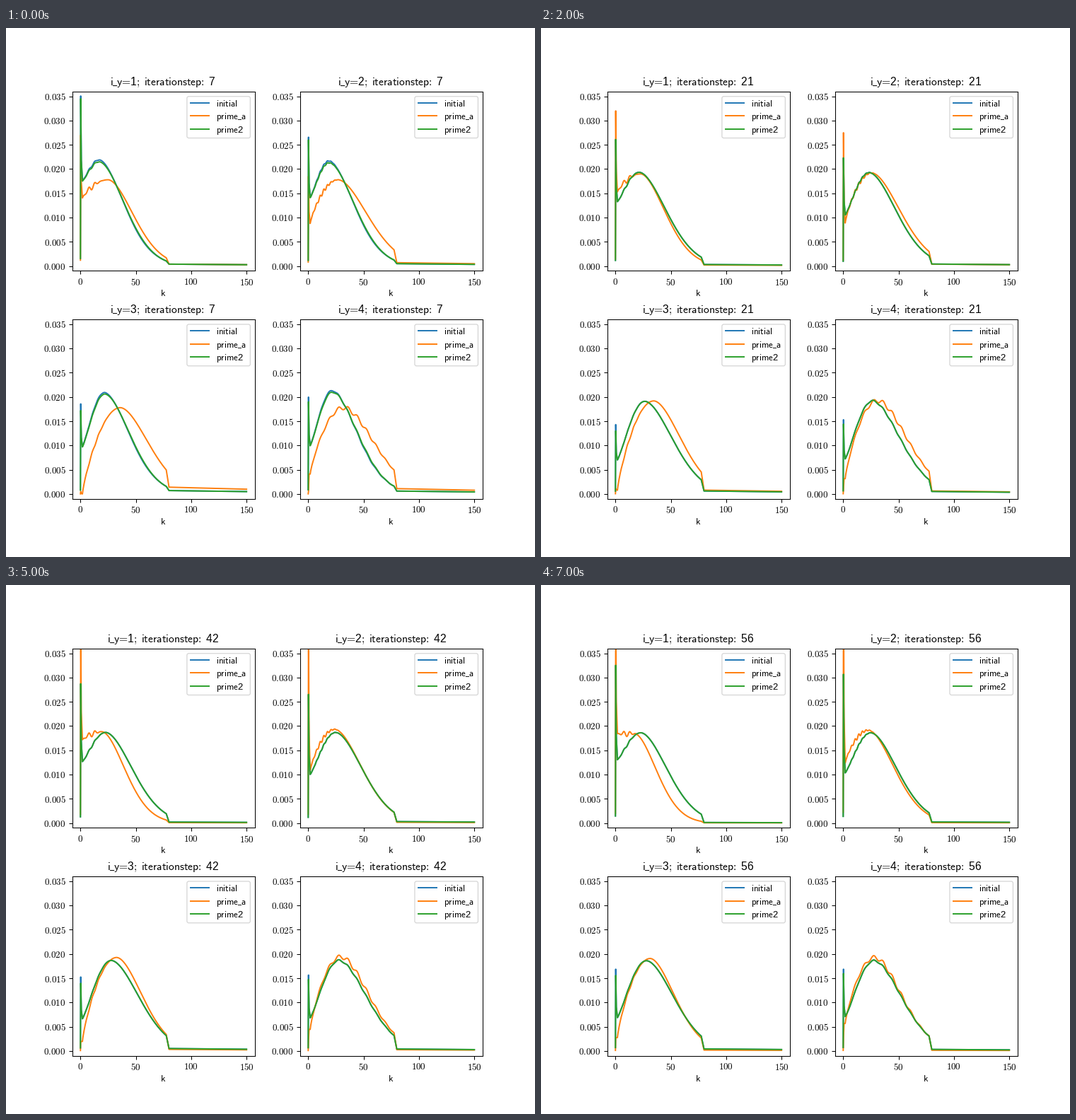
Animation of 748x748 px, one loop 8000 ms. Source, as a matplotlib script:

```python
import numpy as np
import matplotlib.pyplot as plt
from matplotlib.animation import FuncAnimation
from matplotlib.patches import FancyBboxPatch

SIZE, DPI = 748, 93.5
STEPS, STEP_MS = 8, 1000
BLUE, ORANGE, GREEN = "#1f77b4", "#ff7f0e", "#2ca02c"
plt.rcParams["mathtext.fontset"] = "cm"
plt.rcParams["font.family"] = "Liberation Sans"

K = np.linspace(1.8, 77.5, 152)
K_ALL = np.concatenate([[0, 0.25, 0.8], K, [80, 150]])

# Heights are in units of 1e-4. Tuples are (start, change, drift) for relax().
# ripple is (height, period, crest, centre, spread) along k.
PANELS = [
    dict(green=dict(spike=(345, -168, 21), dip=175, top=215, peak=17, grow=3.5, tail=4),
         orange=dict(spike=(270, 0, 25), dip=(140, 0, 6.3), peak=25, slide=-1.1,
                     wide=32.7, tail=4),
         ripple=(6, 5.6, 7.5, 10, 5), lift=0),
    dict(green=dict(spike=(260, -108, 22), dip=141, top=213, peak=19, grow=3.5, tail=5),
         orange=dict(spike=(185, 0, 45), dip=(88, -20, 8), peak=27, slide=-0.6,
                     wide=38, tail=7),
         ripple=(4, 3.3, 7.4, 13, 8), lift=0),
    dict(green=dict(spike=(172, -80, 9), dip=97, top=206, peak=22, grow=5, tail=7),
         orange=dict(spike=(5, 0, 3), dip=(0, 0, 4), peak=36, slide=-0.65,
                     wide=36.2, tail=14),
         ripple=(2, 6, 4.5, 12, 8), lift=13),
    dict(green=dict(spike=(190, -80, 7), dip=99, top=210, peak=22, grow=5, tail=6),
         orange=dict(spike=(5, 0, 3), dip=(40, -30, 6.5), peak=32, slide=-0.5,
                     wide=39.5, tail=11),
         ripple=(4.5, 8.5, 18.9, 38, 30), lift=9)]


def relax(t, start, change, drift=0):
    """Settle by `change`, halving the rest each step, plus a steady drift."""
    return start + change * (1 - 0.5 ** t) + drift * t


def hump(dip, top, peak, wide, power):
    """Rise from the dip to the peak, then fall off like a bell."""
    u = np.clip((K - K[0]) / (peak - K[0]), 0, 1)
    rise = dip + (top - dip) * np.sin(np.pi / 2 * u) ** power
    fall = top * np.exp(-(np.maximum(K - peak, 0) / wide) ** 1.8)
    return np.where(K < peak, rise, fall)


def ripple(height, period, crest, centre, spread):
    wave = np.cos(2 * np.pi * (K - crest) / period)
    return height * wave * np.exp(-((K - centre) / spread) ** 2)


def whole(spike, body, tail):
    """Add the spike near zero and the flat tail to the body."""
    shoulder = body[0] + 0.25 * max(spike - body[0], 0)
    head = [0.045 * spike, spike, shoulder]
    return np.maximum(np.concatenate([head, body, [tail, 0.7 * tail]]), 0)


def green_curve(panel, t):
    g = panel["green"]
    drop = 0.3 * g["dip"] + 11
    body = hump(dip=relax(t, g["dip"], -drop, drop / 24),
                top=relax(t, g["top"], 186 - g["top"]),
                peak=relax(t, g["peak"], 6),
                wide=relax(t, 32.8, g["grow"], -0.3), power=1.2)
    body = body + 0.35 * ripple(*panel["ripple"])
    return whole(relax(t, *g["spike"]), body, g["tail"] - 0.4 * t)


def orange_curve(panel, t):
    o = panel["orange"]
    body = hump(dip=relax(t, *o["dip"]),
                top=relax(t, 178, 22, 2 * o["slide"]),
                peak=o["peak"] + o["slide"] * t,
                wide=o["wide"] - 0.65 * t, power=0.8)
    body = body + ripple(*panel["ripple"])
    return whole(relax(t, *o["spike"]), body, o["tail"] * 0.75 ** t)


def blue_curve(panel, t):
    """The green curve, slightly off at first and with a taller spike."""
    gap = (4 * np.exp(-((K_ALL - 16) / 12) ** 2)
           - 2.5 * np.exp(-((K_ALL - 52) / 14) ** 2)) * 0.3 ** t
    gap[1] += max(panel["lift"], 5 * 0.3 ** t)
    return green_curve(panel, t) + gap


def sans(text):
    """Sans-serif math text with plain text spacing."""
    text = "".join(rf"\mathregular{{{c}}}" if c.isdigit() else c for c in text)
    for plain, spaced in (("_", r"\hspace{-0.08}\_\hspace{-0.08}"),
                          ("=", r"\hspace{-0.2}=\hspace{-0.2}"),
                          ("; ", r";\hspace{0.24}"),
                          (": ", r"\hspace{-0.2}:\hspace{0.26}")):
        text = text.replace(plain, spaced)
    return r"$\mathsf{" + text + "}$"


fig, axes = plt.subplots(2, 2, figsize=(SIZE / DPI, SIZE / DPI), dpi=DPI)
fig.subplots_adjust(left=0.125, right=0.901, bottom=0.11, top=0.88,
                    wspace=0.2465, hspace=0.27)

# Overlay in pixel coordinates, y pointing down.
stage = fig.add_axes([0, 0, 1, 1], zorder=5)
stage.set(xlim=(0, SIZE), ylim=(SIZE, 0))
stage.axis("off")


def draw_legend(x, y):
    stage.add_patch(FancyBboxPatch(
        (x, y), 89.5, 58.8, boxstyle="round,pad=0,rounding_size=2.6",
        fc="white", ec="#d6d6d6", lw=1))
    rows = (("initial", BLUE), ("prime_a", ORANGE), ("prime2", GREEN))
    for i, (name, color) in enumerate(rows):
        mid = y + 9.3 + 18.3 * i
        stage.plot([x + 5.5, x + 31.5], [mid, mid], color=color, lw=1.5)
        stage.text(x + 41.5, mid + 5, sans(name), size=10, va="baseline")


lines, titles = [], []
for ax in axes.flat:
    ax.set(xlim=(-7.5, 157.5), ylim=(-0.001, 0.036))
    xt, yt = np.arange(0, 151, 50), np.arange(8) * 0.005
    ax.set_xticks(xt, [f"${v}$" for v in xt])
    ax.set_yticks(yt, [f"${v:.3f}$" for v in yt])
    lines.append([ax.plot([], [], color=c, lw=1.5)[0]
                  for c in (BLUE, ORANGE, GREEN)])
    box = ax.get_position()
    mid = (box.x0 + box.x1) / 2 * SIZE
    top, bottom = (1 - box.y1) * SIZE, (1 - box.y0) * SIZE
    titles.append(stage.text(mid - 1, top - 8.6, "", size=12,
                             ha="center", va="baseline"))
    stage.text(mid - 0.5, bottom + 36, sans("k"), size=10,
               ha="center", va="baseline")
    draw_legend(box.x1 * SIZE - 96, top + 7)


def update(step):
    for n, (panel, group) in enumerate(zip(PANELS, lines), 1):
        for line, curve in zip(group, (blue_curve, orange_curve, green_curve)):
            line.set_data(K_ALL, curve(panel, step) * 1e-4)
        titles[n - 1].set_text(sans(f"i_y={n}; iterationstep: {7 * (step + 1)}"))
    return [line for group in lines for line in group] + titles


anim = FuncAnimation(fig, update, frames=STEPS, interval=STEP_MS, repeat=True)
plt.show()
```
